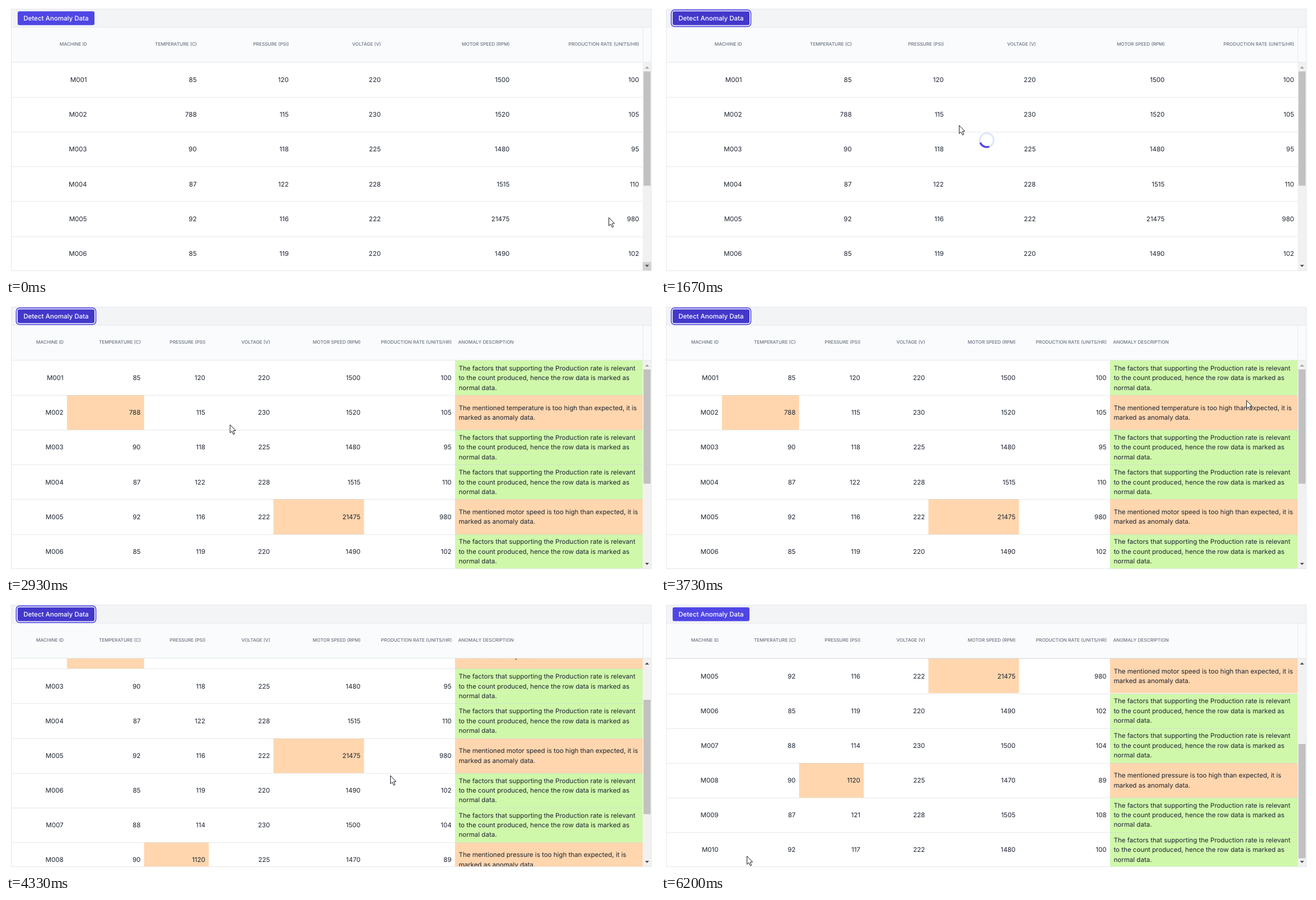
Animation of 1159 by 483 pixels, one loop 6.34 s. Source, as an HTML page with a canvas:

```html
<!DOCTYPE html>
<html lang="en">
<head>
<meta charset="utf-8">
<title>Anomaly detection grid</title>
<style>
  html, body { margin: 0; width: 100%; height: 100%; overflow: hidden; background: #fff; }
  canvas { display: block; }
</style>
</head>
<body>
<canvas id="stage" width="1159" height="483"></canvas>
<script>
const ctx = document.getElementById('stage').getContext('2d');
ctx.textRendering = 'geometricPrecision';

const LOOP = 6340, STEP = 200 / 3;
const TOP = 101, BOTTOM = 473.5, ROW_H = 62.1, LINE_H = 17.4;
const LEFT = 10, BAR_X = 1137, RIGHT = 1153, PAD = 6.2;
const SCROLL_MAX = 248, RESULT_AT = 2660, SPIN_AT = 1130;
const LINE = '#e5e7eb', ORANGE = '#ffd6ae', GREEN = '#d0f8ab';
const FAMILY = 'Inter, "Liberation Sans", sans-serif';

// Heading and relative column width
const COLUMNS = [['MACHINE ID', 120], ['TEMPERATURE (C)', 167], ['PRESSURE (PSI)', 140],
  ['VOLTAGE (V)', 140], ['MOTOR SPEED (RPM)', 196], ['PRODUCTION RATE (UNITS/HR)', 197]];
const NOTE_WIDTH = 406;

const ROWS = `M001 85 120 220 1500 100
M002 788 115 230 1520 105
M003 90 118 225 1480 95
M004 87 122 228 1515 110
M005 92 116 222 21475 980
M006 85 119 220 1490 102
M007 88 114 230 1500 104
M008 90 1120 225 1470 89
M009 87 121 228 1505 108
M010 92 117 222 1480 100`.split('\n').map(line => line.split(' '));

// Highest plausible reading, by column
const LIMITS = { 1: [200, 'temperature'], 2: [500, 'pressure'], 4: [5000, 'motor speed'] };
const NORMAL = ['The factors that supporting the Production rate is relevant',
  'to the count produced, hence the row data is marked as', 'normal data.'];

// Pointer moves: start, end, x, y
const HOME = [1076, 378];
const MOVES = [
  [0, 333, 151, 23], [467, 800, 114, 21], [1130, 1667, 532, 213], [1667, 2467, 456, 246],
  [2467, 3000, 397, 214], [3133, 3667, 1066, 164], [3667, 4133, 686, 310],
  [4533, 4800, 888, 354], [4800, 5200, 141, 453], [5200, 5267, 132, 465], [6067, 6200, 153, 454]
];

const progress = (t, a, b) => Math.min(1, Math.max(0, (t - a) / (b - a)));
const ramp = (t, a, b) => { const p = progress(t, a, b); return p * p * (3 - 2 * p); };
const scrollAt = t => SCROLL_MAX * progress(t, 4184, 4466) ** 1.34;

// Column edges fill the width, with or without the note column
function edges(result) {
  const sum = COLUMNS.reduce((s, c) => s + c[1], result ? NOTE_WIDTH : 0);
  let x = LEFT - .2;
  return [x, ...COLUMNS.map(c => x += c[1] * (BAR_X - LEFT) / sum)];
}

// Eased turn, cubic-bezier(.21, .21, .31, .81)
function turn(x) {
  const curve = (u, a, b) => 3 * u * (1 - u) * (1 - u) * a + 3 * u * u * (1 - u) * b + u * u * u;
  let lo = 0, hi = 1;
  for (let i = 0; i < 20; i++) {
    const mid = (lo + hi) / 2;
    if (curve(mid, .21, .31) < x) lo = mid; else hi = mid;
  }
  return curve(lo, .21, .81);
}

function rect(x, y, w, h, fill) {
  ctx.fillStyle = fill;
  ctx.fillRect(x, y, w, h);
}

function text(s, x, y, size, color, align = 'left', weight = 400) {
  ctx.font = `${weight} ${size}px ${FAMILY}`;
  ctx.textAlign = align;
  ctx.fillStyle = color;
  ctx.fillText(s, x, y);
}

function button(t) {
  const blur = ramp(t, 5640, 5930);
  const ring = ramp(t, 930, 1210) * (1 - blur);
  const dark = ramp(t, 500, 730) * (1 - blur);
  const x = 20.8, y = 9.6, w = 137.2, h = 24.6;
  const halo = (d, color) => {
    ctx.fillStyle = color;
    ctx.beginPath();
    ctx.roundRect(x - d, y - d, w + 2 * d, h + 2 * d, 3.3 + d);
    ctx.fill();
  };
  if (ring > 0) {
    halo(3.3 * ring, '#4f46e5');
    halo(1.65 * ring, '#fff');
  }
  const mix = (a, b) => Math.round(a + (b - a) * dark);
  halo(0, `rgb(${mix(79, 67)},${mix(70, 56)},${mix(229, 202)})`);
  text('Detect Anomaly Data', x + w / 2, 25.7, 11.55, '#fff', 'center', 500);
}

function header(t, result, xs) {
  rect(LEFT, 6, RIGHT - LEFT, 32, '#f3f4f6');
  rect(LEFT, 38, RIGHT - LEFT, 63, '#f9fbfc');
  rect(LEFT, 37.5, RIGHT - LEFT, 1, LINE);
  rect(LEFT, 100, RIGHT - LEFT, 1, LINE);
  rect(BAR_X, 38, 1, 63, LINE);
  const put = (s, x, align) => text(s, x, 70.7, 8.25, '#6b7280', align, 500);
  COLUMNS.forEach(([s], i) => put(s, xs[i + 1] - PAD + .3, 'right'));
  if (result) put('ANOMALY DESCRIPTION', xs[6] + PAD - .6, 'left');
  button(t);
}

function note(bad, base, x) {
  const lines = bad
    ? [`The mentioned ${LIMITS[bad][1]} is too high than expected, it is`, 'marked as anomaly data.']
    : NORMAL;
  lines.forEach((s, i) =>
    text(s, x, base + (i - (lines.length - 1) / 2) * LINE_H, 11.55, '#1c2430'));
}

function body(scroll, result, xs) {
  ctx.save();
  ctx.beginPath();
  ctx.rect(LEFT, TOP, BAR_X - LEFT, BOTTOM - TOP);
  ctx.clip();
  ROWS.forEach((row, r) => {
    const y = TOP + r * ROW_H - scroll, base = y + ROW_H / 2 + 4.2;
    const top = Math.round(y), height = Math.round(y + ROW_H) - top;
    if (result) {
      const bad = Object.keys(LIMITS).map(Number).find(c => row[c] > LIMITS[c][0]);
      rect(xs[6], top, BAR_X - xs[6], height, bad ? ORANGE : GREEN);
      if (bad) rect(xs[bad], top, xs[bad + 1] - xs[bad], height, ORANGE);
      note(bad, base, xs[6] + PAD + .4);
    }
    row.forEach((s, i) => text(s, xs[i + 1] - PAD, base, 11.55, '#1c2430', 'right'));
    if (r) rect(LEFT, top, BAR_X - LEFT, 1, 'rgba(206,210,218,.5)');
  });
  ctx.restore();
}

function arrow(y, dir, color) {
  const x = 1144.8;
  ctx.fillStyle = color;
  ctx.beginPath();
  ctx.moveTo(x - 3.6, y - 2 * dir);
  ctx.lineTo(x + 3.6, y - 2 * dir);
  ctx.lineTo(x, y + 2 * dir);
  ctx.fill();
}

function scrollbar(t, scroll) {
  rect(BAR_X, TOP, 15.5, BOTTOM - TOP, '#f1f1f1');
  if (t < 60) rect(BAR_X, 458, 15.5, 15.5, '#d2d2d2');
  rect(1138.5, Math.floor(117 + scroll * 137 / SCROLL_MAX), 12.5, 204.5, '#c1c1c1');
  arrow(110, -1, scroll > 0 ? '#505050' : '#a3a3a3');
  arrow(465, 1, '#505050');
}

function spinner(t) {
  const a = turn((t - 1195 + 1300) % 1300 / 1300) * 2 * Math.PI - Math.PI / 2;
  const arc = (from, to, color) => {
    ctx.strokeStyle = color;
    ctx.beginPath();
    ctx.arc(581.7, 240, 12.4, from, to);
    ctx.stroke();
  };
  ctx.lineWidth = 3.3;
  arc(0, 2 * Math.PI, '#e0e7ff');
  arc(a - Math.PI / 4, a + Math.PI / 4, '#4f46e5');
}

function pointer(t) {
  if (t > 5300 && t < 6120) return;
  let [x, y] = HOME;
  for (const [a, b, toX, toY] of MOVES) {
    const p = ramp(t, a, b);
    x += (toX - x) * p;
    y += (toY - y) * p;
  }
  ctx.save();
  ctx.translate(x + .6, y + .6);
  ctx.beginPath();
  ctx.moveTo(0, 0);
  for (const [px, py] of [[0, 14.6], [3.3, 11.6], [5.8, 17.2], [8.2, 16.2], [5.7, 10.7], [10, 10.4]]) {
    ctx.lineTo(px, py);
  }
  ctx.closePath();
  ctx.fillStyle = '#fff';
  ctx.fill();
  ctx.lineWidth = 1;
  ctx.strokeStyle = '#15181f';
  ctx.stroke();
  ctx.restore();
}

function draw(t) {
  const result = t >= RESULT_AT, scroll = scrollAt(t), xs = edges(result);
  rect(0, 0, 1159, 483, '#fff');
  body(scroll, result, xs);
  header(t, result, xs);
  scrollbar(t, scroll);
  ctx.lineWidth = 1;
  ctx.strokeStyle = LINE;
  ctx.strokeRect(LEFT - .5, 5.5, RIGHT - LEFT, 468);
  if (t >= SPIN_AT && !result) spinner(t);
  pointer(t);
}

// The picture advances 15 times per second.
const start = performance.now();
function tick() {
  const t = (performance.now() - start) % LOOP;
  draw(Math.floor((t + 4) / STEP) * STEP);
  requestAnimationFrame(tick);
}
tick();
</script>
</body>
</html>
```
